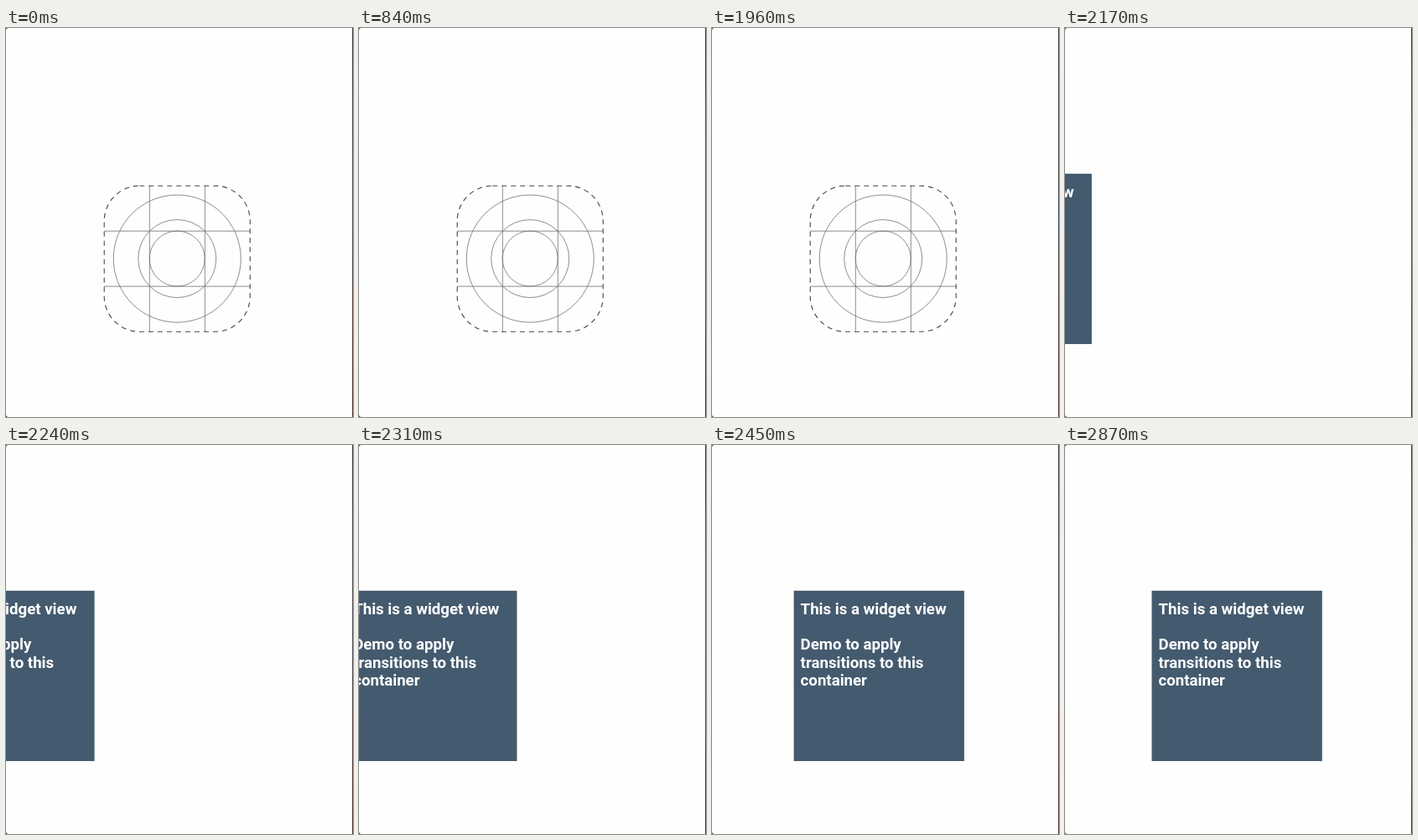
An HTML page that plays this animation: 414x464 px, repeating every 2.94 s.

```html
<!DOCTYPE html>
<html lang="en">
<head>
<meta charset="utf-8">
<style>
  html, body { margin: 0; height: 100%; overflow: hidden; background: #fefefe; }
  svg { display: block; width: 414px; height: 464px; }
  text { font: 700 18.67px Roboto, sans-serif; fill: #fff; }
</style>
</head>
<body>
<svg viewBox="0 0 414 464">
  <defs>
    <linearGradient id="edge" x2="0" y2="1">
      <stop offset="0" stop-color="#3c3a40"/>
      <stop offset=".3" stop-color="#55504f"/>
      <stop offset=".5" stop-color="#4a5360"/>
      <stop offset=".7" stop-color="#5c453f"/>
      <stop offset="1" stop-color="#4d3333"/>
    </linearGradient>
  </defs>
  <rect width="414" height="464" fill="#fefefe"/>

  <g id="icon" fill="none" stroke="#707070" stroke-width=".8">
    <path d="M171.3 188V362M237.3 188V362M117 242.2H291M117 308.2H291"/>
    <circle cx="204.2" cy="275.1" r="76"/>
    <circle cx="204.2" cy="275.1" r="46.5"/>
    <circle cx="204.2" cy="275.1" r="33"/>
    <rect x="117.2" y="188.2" width="174" height="174" rx="42"
          stroke="#444" stroke-width="1.1" stroke-dasharray="6 5"/>
  </g>

  <g id="card">
    <rect y="173.8" width="203.3" height="203.2" fill="#445a6e"/>
    <text x="8" y="202">This is a widget view</text>
    <text x="8" y="243.6">Demo to apply</text>
    <text x="8" y="265.5">transitions to this</text>
    <text x="8" y="287.4">container</text>
  </g>

  <rect x="413" width="1" height="464" fill="url(#edge)"/>
  <path d="M0 0H2L0 2ZM0 464H2L0 462Z" fill="#555"/>
</svg>
<script>
  const LOOP = 2940, STEP = 70, SWITCH = 2170;
  const START = 2054, DURATION = 433, TRAVEL = 330, REST = 103.5;
  const icon = document.getElementById('icon');
  const card = document.getElementById('card');

  function draw(now) {
    const t = Math.floor(now % LOOP / STEP) * STEP;
    const shown = t >= SWITCH;
    const p = Math.min(1, Math.max(0, (t - START) / DURATION));
    const left = REST - TRAVEL * (1 + Math.cos(Math.PI * p)) / 2;
    icon.style.display = shown ? 'none' : '';
    card.style.display = shown ? '' : 'none';
    card.setAttribute('transform', `translate(${left.toFixed(2)} 0)`);
  }

  const begin = performance.now();
  function tick() {
    draw(performance.now() - begin);
    requestAnimationFrame(tick);
  }
  tick();
</script>
</body>
</html>
```
